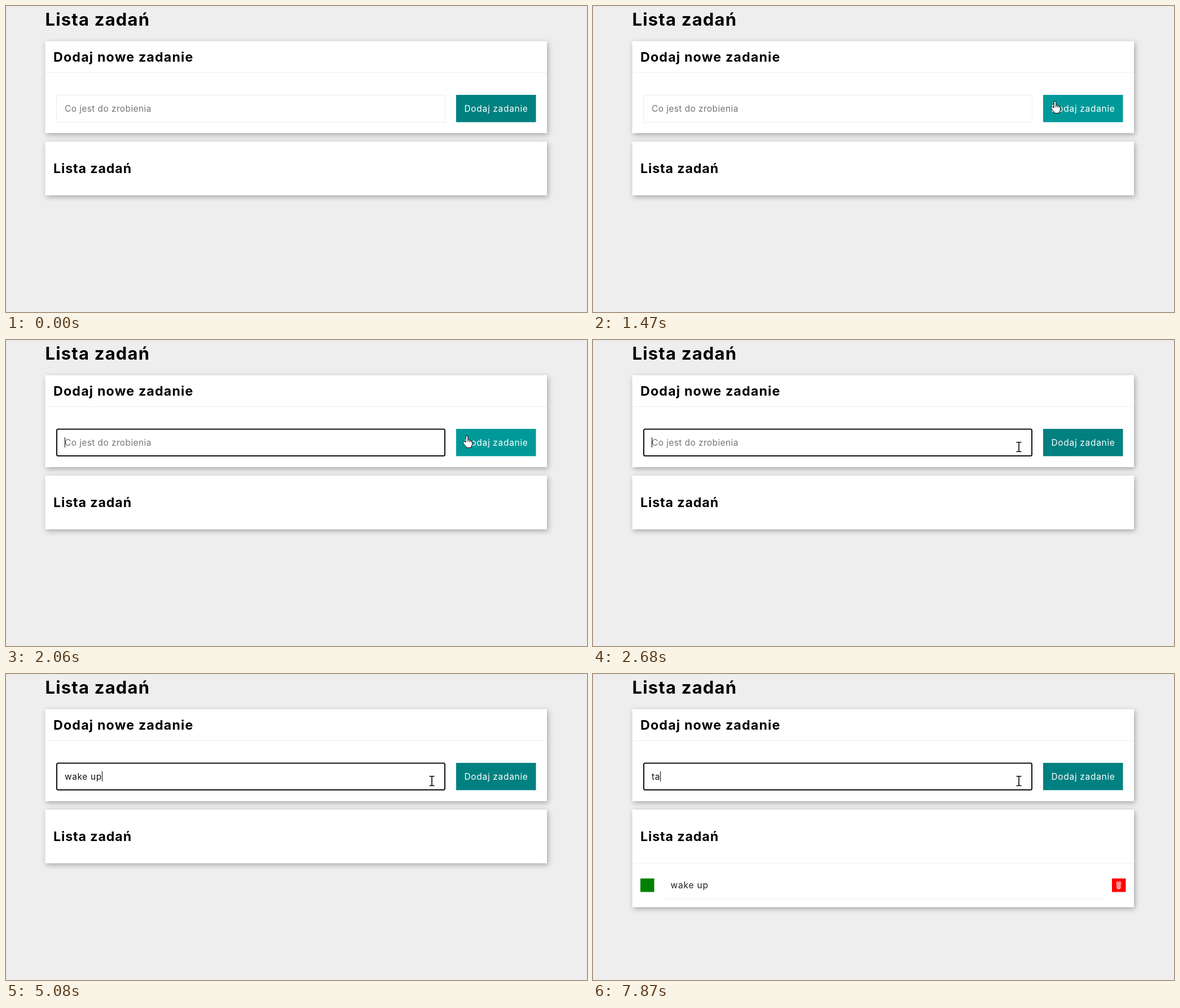
These frames come from a looping animation (1030x544 px, 8000 ms). An HTML page:

```html
<!DOCTYPE html>
<html lang="pl">
<head>
<meta charset="utf-8">
<title>Lista zadań</title>
<style>
  html, body { margin: 0; width: 100%; height: 100%; overflow: hidden; background: #eee; }
  svg { display: block; width: 1030px; height: 544px; }
  text { font: 400 15.5px Inter, "Open Sans", sans-serif; white-space: pre; }
  .title { font-size: 31px; font-weight: 700; letter-spacing: 1.18px; }
  .head { font-size: 23.25px; font-weight: 700; letter-spacing: .86px; }
  .wide { letter-spacing: 1.15px; }
  .card { fill: #fff; filter: drop-shadow(2px 3px 5px rgba(0, 0, 0, .3)); }
  .line { stroke: #eee; }
  #cursor path { fill: #fff; stroke: #000; stroke-linejoin: round; }
  #cursor .beam { fill: none; stroke-width: 1.6; }
</style>
</head>
<body>
<svg viewBox="0 0 1030 544">
  <rect width="1030" height="544" fill="#eee"/>
  <path d="M0 .5H1030M.5 0V544" stroke="#e5e5e5"/>
  <text class="title" x="69.5" y="34.5">Lista zadań</text>

  <rect class="card" x="69.5" y="62.5" width="889.5" height="163.5"/>
  <text class="head wide" x="84" y="99">Dodaj nowe zadanie</text>
  <path class="line" d="M69.5 118.5H959"/>
  <rect id="field" fill="#fff"/>
  <text id="hint" x="104" y="188" fill="#757575" letter-spacing=".4">Co jest do zrobienia</text>
  <text id="typed" x="104" y="188" fill="#111" letter-spacing=".6"></text>
  <rect id="caret" y="173" width="1" height="18"/>
  <rect id="button" x="798" y="158" width="141.5" height="48.5"/>
  <text x="812.5" y="188" fill="#fff" letter-spacing=".68">Dodaj zadanie</text>

  <rect id="list" class="card" x="69.5" y="241" width="889.5"/>
  <text class="head" x="84" y="297">Lista zadań</text>
  <g id="task">
    <path class="line" d="M69.5 336.5H959M123 399.5H905"/>
    <rect x="84" y="363.5" width="24.5" height="24" fill="green"/>
    <text x="137.5" y="381" fill="#222" letter-spacing=".8">wake up</text>
    <rect x="920" y="363.5" width="24.5" height="24" fill="red"/>
    <g fill="none" stroke="#fff" stroke-width=".9">
      <ellipse cx="932" cy="370.5" rx="4" ry="1.3"/>
      <path d="M928 371L929 381Q932 383 935 381L936 371M930.5 372V381.5M932 372V382M933.5 372V381.5"/>
    </g>
  </g>

  <g id="cursor">
    <path id="arrow" d="M0 0V16.5L3.8 13L6.3 18.8L8.8 17.7L6.3 12H11.6Z"/>
    <path id="hand" d="M-1.8 12V2Q-1.6 .3 0 .3T1.8 2V7.5Q3.5 6.5 4.7 8.3Q6.4 7.5 7.3 9.2Q9.5 8.8 9.5 11.2V15Q9.3 18 7.5 19.5V21.5H-1.2V19.5Q-4 17-6.8 12.7Q-7.5 10.5-5.5 10.2Q-3.8 10.3-1.8 12ZM1.8 7.5V11M4.7 8.5V11.5M7.3 9.5V12"/>
    <path id="beam" class="beam" d="M-4.5-8.2H-1.5L0-7.6L1.5-8.2H4.5M0-7.6V7.9M-4.5 8.5H-1.5L0 7.9L1.5 8.5H4.5"/>
  </g>
</svg>
<script>
const LOOP = 8000, FOCUS = 1540, ADDED = 5610;
const HOME = [819, 169];
const keys = [
  [3430, "w"], [3890, "wa"], [4170, "wak"], [4300, "wake"], [4550, "wake "],
  [4690, "wake u"], [5080, "wake up"], [ADDED, ""], [7670, "t"], [7870, "ta"]
];
const caretOff = [[0, FOCUS], [2140, 2670], [3170, 3430], [6150, 6670], [7200, 7670]];

const $ = id => document.getElementById(id);
const show = (id, on) => $(id).setAttribute("visibility", on ? "visible" : "hidden");
const set = (id, attrs) => {
  for (const name in attrs) $(id).setAttribute(name, attrs[name]);
};
const mix = (a, b, p) => a.map((v, i) => v + (b[i] - v) * p);
// Progress from start to end, held on evenly spaced steps like a screen recorder
const stepped = (t, start, end, n) =>
  Math.max(0, Math.min(1, Math.floor((t - start) / (end - start) * n + 1e-6) / n));

function pointer(t) {
  if (t < 1930) {
    const p = stepped(t, 380, 980, 9);
    return mix([932, 496], HOME, 1 - (1 - p) ** 2);
  }
  const p = stepped(t, 1930, 2680, 10);
  return mix(HOME, [755, 190], p * p * (3 - 2 * p));
}

function draw(t) {
  const focused = t >= FOCUS, added = t >= ADDED;
  const [x, y] = pointer(t);
  const inRow = y >= 158 && y < 207;
  const hover = t >= 380 && inRow && x >= 798 && x < 940;
  const inField = inRow && x < 779;
  const last = keys.filter(k => k[0] <= t).pop();
  const text = last ? last[1] : "";

  set("field", focused
    ? { x: 90, y: 158.5, width: 688, height: 47.5, rx: 2.5, stroke: "#101010", "stroke-width": 2 }
    : { x: 89.5, y: 158.5, width: 689, height: 48, rx: 0, stroke: "#eee", "stroke-width": 1 });
  $("typed").textContent = text;
  show("hint", !text);
  show("caret", !caretOff.some(([a, b]) => t >= a && t < b));
  set("caret", { x: Math.round(104 + (text ? $("typed").getComputedTextLength() : 0)) });

  set("button", { fill: hover ? "#099" : "#008080" });
  set("list", { height: added ? 173.5 : 95.5 });
  show("task", added);

  const visible = t >= 380;
  set("cursor", { transform: `translate(${Math.round(x)} ${Math.round(y)})` });
  show("hand", visible && hover);
  show("beam", visible && inField);
  show("arrow", visible && !hover && !inField);
}

const began = performance.now();
function tick() {
  draw((performance.now() - began) % LOOP);
  requestAnimationFrame(tick);
}
tick();
</script>
</body>
</html>
```
